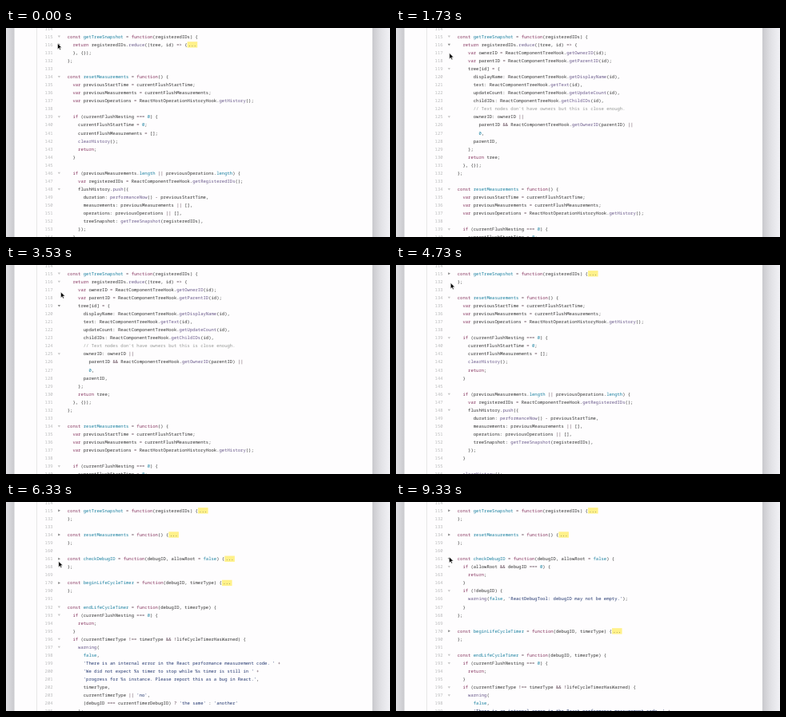
An HTML page for the animation above (9.39 s loop, 480 by 262 pixels).

```html
<!DOCTYPE html>
<html lang="en">
<head>
<meta charset="utf-8">
<title>Code folding</title>
<style>
html, body { margin: 0; width: 100%; height: 100%; overflow: hidden; background: #fff; }
svg { display: block; width: 480px; height: 262px; }
text {
  font: 5.55px "Noto Sans Mono", "DejaVu Sans Mono", monospace;
  text-rendering: geometricPrecision;
  white-space: pre;
  fill: #333;
}
.num { fill: #b9babb; text-anchor: end; }
.key { fill: #86355f; }
.op { fill: #5f4453; }
.const { fill: #187f9f; }
.call { fill: #69598a; }
.str { fill: #23376f; }
.note { fill: #969896; }
.dots { fill: #fff18a; }
</style>
</head>
<body>
<svg id="stage" viewBox="0 0 480 262">
  <defs>
    <linearGradient id="shade">
      <stop offset="0" stop-color="#c9c9cd"/>
      <stop offset=".5" stop-color="#e2e2e6"/>
      <stop offset="1" stop-color="#f1f1f5"/>
    </linearGradient>
  </defs>
  <rect width="480" height="262" fill="#fefdfe"/>
  <rect width="22" height="262" fill="url(#shade)" transform="matrix(-1 0 0 1 10.5 0)"/>
  <rect width="22" height="262" fill="url(#shade)" transform="translate(458 0)"/>
  <rect x="38" width=".7" height="262" fill="#ddd"/>
  <g id="code"></g>
  <path id="cursor" d="M0 0V7.2L1.7 5.6L2.8 8.1L4 7.6L2.9 5.1H5.2Z" fill="#000" stroke="#fff" stroke-width=".5"/>
</svg>
<script>
const FIRST = 114;
const source = `

const getTreeSnapshot = function(registeredIDs) {
  return registeredIDs.reduce((tree, id) => {
    var ownerID = ReactComponentTreeHook.getOwnerID(id);
    var parentID = ReactComponentTreeHook.getParentID(id);
    tree[id] = {
      displayName: ReactComponentTreeHook.getDisplayName(id),
      text: ReactComponentTreeHook.getText(id),
      updateCount: ReactComponentTreeHook.getUpdateCount(id),
      childIDs: ReactComponentTreeHook.getChildIDs(id),
      // Text nodes don't have owners but this is close enough.
      ownerID: ownerID ||
        parentID && ReactComponentTreeHook.getOwnerID(parentID) ||
        0,
      parentID,
    };
    return tree;
  }, {});
};

const resetMeasurements = function() {
  var previousStartTime = currentFlushStartTime;
  var previousMeasurements = currentFlushMeasurements;
  var previousOperations = ReactHostOperationHistoryHook.getHistory();

  if (currentFlushNesting === 0) {
    currentFlushStartTime = 0;
    currentFlushMeasurements = [];
    clearHistory();
    return;
  }

  if (previousMeasurements.length || previousOperations.length) {
    var registeredIDs = ReactComponentTreeHook.getRegisteredIDs();
    flushHistory.push({
      duration: performanceNow() - previousStartTime,
      measurements: previousMeasurements || [],
      operations: previousOperations || [],
      treeSnapshot: getTreeSnapshot(registeredIDs),
    });
  }

  clearHistory();
  currentFlushStartTime = performanceNow();
  currentFlushMeasurements = [];
};

const checkDebugID = function(debugID, allowRoot = false) {
  if (allowRoot && debugID === 0) {
    return;
  }
  if (!debugID) {
    warning(false, 'ReactDebugTool: debugID may not be empty.');
  }
};

const beginLifeCycleTimer = function(debugID, timerType) {
  if (currentFlushNesting === 0) {
    return;
  }
  if (currentTimerType && !lifeCycleTimerHasWarned) {
    warning(
      false,
      'There is an internal error in the React performance measurement code. ' +
      'Did not expect %s timer to start while %s timer is still in ' +
      'progress for %s instance. Please report this as a bug in React.',
      timerType,
      currentTimerType || 'no',
      (debugID === currentTimerDebugID) ? 'the same' : 'another'
    );
    lifeCycleTimerHasWarned = true;
  }
  currentTimerStartTime = performanceNow();
  currentTimerNestedFlushDuration = 0;
  currentTimerDebugID = debugID;
  currentTimerType = timerType;
};

const endLifeCycleTimer = function(debugID, timerType) {
  if (currentFlushNesting === 0) {
    return;
  }
  if (currentTimerType !== timerType && !lifeCycleTimerHasWarned) {
    warning(
      false,
      'There is an internal error in the React performance measurement code. ' +
      'We did not expect %s timer to stop while %s timer is still in ' +
      'progress for %s instance. Please report this as a bug in React.',
      timerType,
      currentTimerType || 'no',
      (debugID === currentTimerDebugID) ? 'the same' : 'another'
    );`.slice(1).split('\n');

const LOOP = 9390, PITCH = 10.07, CHAR = 3.33, LEFT = 76.8, TOP = 12.7;

// [time, line, folded]
const toggles = [
  [0, 116, true], [1140, 116, false], [2530, 119, true], [3130, 119, false],
  [4330, 115, true], [5330, 134, true], [5670, 161, true], [6000, 170, true],
  [8800, 161, false]
];

// [time, x, y] of the pointer tip
const path = [
  [0, 64.5, 19.5], [1250, 64.5, 19.5], [1730, 66.8, 31.5], [2200, 66.5, 50],
  [3200, 66.5, 50], [3530, 68.5, 34], [3950, 66.5, 10], [4400, 66.5, 10],
  [4730, 68.3, 22.5], [5070, 66.5, 40], [5360, 66.5, 40], [5570, 66.5, 70],
  [5720, 66.5, 70], [5900, 66.5, 100], [6040, 66.5, 100], [6330, 65.8, 74.5],
  [6800, 66.6, 72.8], [7930, 66.6, 72.8], [8500, 66.5, 69], [LOOP, 66.5, 69]
];

const token = /(?<note>\/\/.*)|(?<str>'[^']*')|(?<key>\b(?:const|var|function|return|if)\b)|(?<op>=>|[!=]==|&&|\|\||[=+?!]| - )|(?<const>(?<=const )\w+|\b(?:false|true|length|\d+)\b)|(?<call>\w+(?=\())/g;

function add(parent, tag, attrs, text) {
  const el = document.createElementNS('http://www.w3.org/2000/svg', tag);
  for (const name in attrs) el.setAttribute(name, attrs[name]);
  if (text) el.textContent = text;
  return parent.appendChild(el);
}

function paint(parent, line) {
  let end = 0;
  for (const match of line.matchAll(token)) {
    if (match.index > end) add(parent, 'tspan', {}, line.slice(end, match.index));
    const kind = Object.keys(match.groups).find(name => match.groups[name]);
    add(parent, 'tspan', { class: kind }, match[0]);
    end = match.index + match[0].length;
  }
  if (end < line.length) add(parent, 'tspan', {}, line.slice(end));
}

const indentOf = line => line.search(/\S/);

function blockEnd(start) {
  let i = start + 1;
  while (i < source.length && (!source[i] || indentOf(source[i]) > indentOf(source[start]))) i++;
  return i;
}

const code = document.getElementById('code');
const cursor = document.getElementById('cursor');

const rows = source.map((line, i) => {
  const group = add(code, 'g', {});
  const indent = Math.max(0, indentOf(line));
  add(group, 'text', { x: 58.6, class: 'num' }, String(FIRST + i));
  paint(add(group, 'text', { x: LEFT + indent * CHAR }), line.trim());
  const row = { group, end: blockEnd(i) };
  if (line && row.end > i + 1 && source[i + 1]) {
    const x = LEFT + line.length * CHAR;
    row.arrow = add(group, 'path', {});
    row.dots = add(group, 'g', {});
    add(row.dots, 'rect', { x, y: -5.6, width: 12.6, height: 7.4, class: 'dots' });
    add(row.dots, 'text', { x: x + 1.3 }, '...');
  }
  return row;
});

function layout(time) {
  const folded = {};
  let hot;
  for (const [at, line, state] of toggles) {
    if (at > time) break;
    folded[line] = state;
    hot = line;
  }
  let place = -1, hiddenTo = 0;
  rows.forEach((row, i) => {
    const line = FIRST + i, shown = i >= hiddenTo;
    row.group.setAttribute('display', shown ? 'inline' : 'none');
    if (!shown) return;
    row.group.setAttribute('transform', `translate(0 ${TOP + PITCH * place++})`);
    if (!row.arrow) return;
    const closed = Boolean(folded[line]);
    if (closed) hiddenTo = row.end;
    row.dots.setAttribute('display', closed ? 'inline' : 'none');
    row.arrow.setAttribute('d', closed ? 'M65.2 -3.4L68 -1.9L65.2 -.4Z' : 'M64.7 -3.1H68L66.35 -.6Z');
    row.arrow.setAttribute('fill', closed || line === hot ? '#858585' : '#c6c6c6');
  });
}

function pointer(time) {
  const next = Math.max(1, path.findIndex(point => point[0] > time));
  const [t0, x0, y0] = path[next - 1], [t1, x1, y1] = path[next];
  const k = (time - t0) / (t1 - t0);
  cursor.setAttribute('transform', `translate(${x0 + (x1 - x0) * k} ${y0 + (y1 - y0) * k})`);
}

const start = performance.now();

function draw() {
  const time = (performance.now() - start) % LOOP;
  layout(time);
  pointer(time);
  requestAnimationFrame(draw);
}
draw();
</script>
</body>
</html>
```
